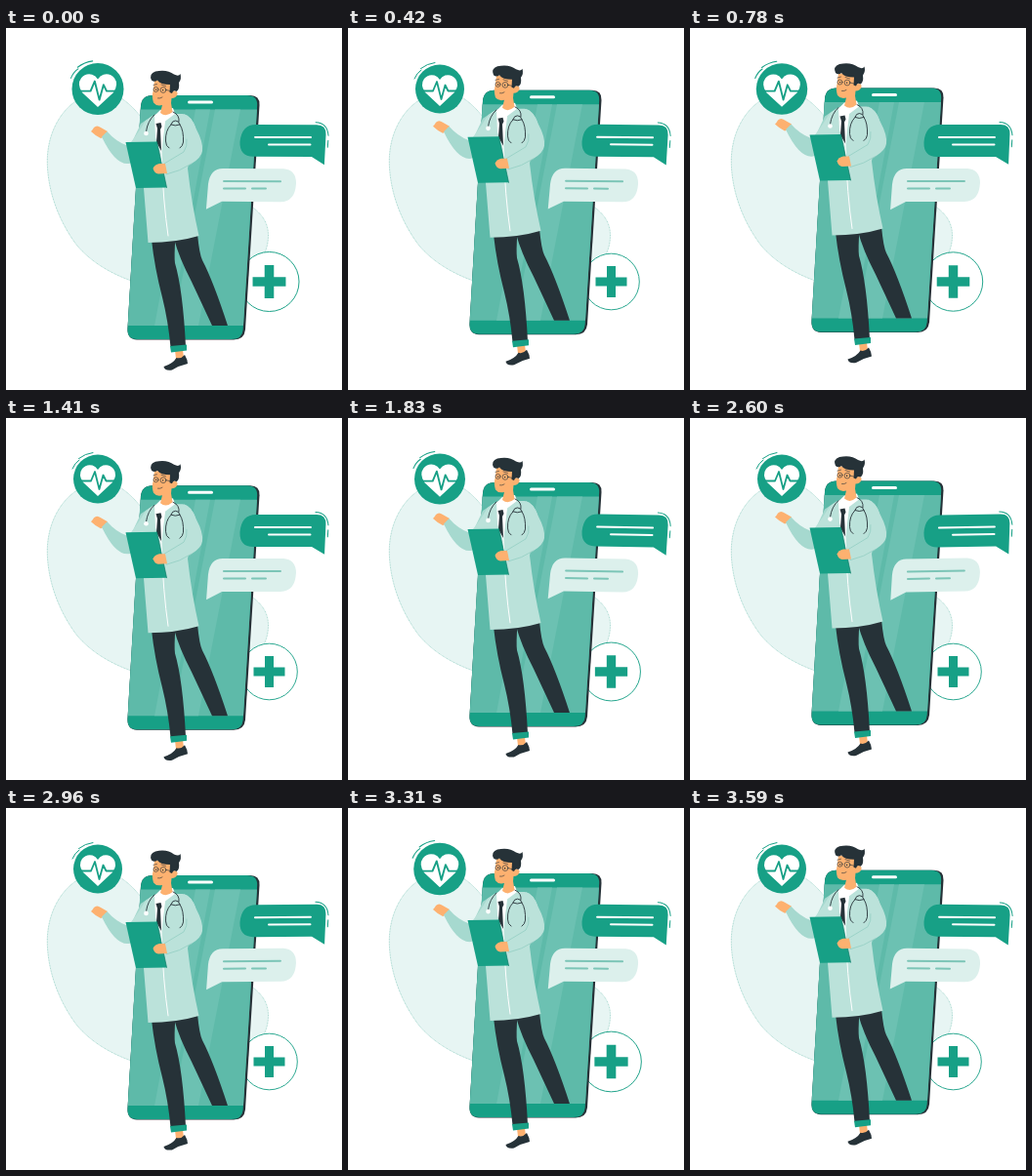
Animation, 344 px wide and 371 px high, one loop 3660 ms. Source, as an HTML page:

```html
<!DOCTYPE html>
<html lang="en">
<head>
<meta charset="utf-8">
<title>Online doctor</title>
<style>
  html, body { margin: 0; height: 100%; overflow: hidden; background: #fff; }
  svg { display: block; width: 344px; height: 371px; }
  .green { fill: #17a086; }
  .dark { fill: #263238; }
  .skin { fill: #fdb170; }
  .coat { fill: #bbe2da; }
  .sleeve { fill: #a6d9cf; }
  .white { fill: #fff; }
  .line { fill: none; stroke-linecap: round; stroke-linejoin: round; }
  .thin { stroke: #263238; stroke-width: .9; }
  .fold { stroke: #93cfc3; stroke-width: .8; }
  .mint { stroke: #17a086; }
  .pale { stroke: #fff; stroke-width: 2; }
</style>
</head>
<body>
<svg viewBox="0 0 344 371">
  <path fill="#e7f5f3" stroke="#7cc5b7" stroke-width=".6" stroke-dasharray="1 .6"
    d="M42.300 135C43 95 70 66 98 66C125 66 140 95 165 125C205 172 268 172 268.500 212C269 245 235 268 195 270C140 270 95 250 72 222C50 192 42 160 42.300 135Z"/>

  <g class="beat">
    <circle cx="269.5" cy="260" r="28.800" fill="#fff" stroke="#17a086" stroke-width=".9"/>
    <path class="green" d="M265 244h9v11.500h11.500v9H274V276h-9v-11.500h-11.500v-9H265Z"/>
  </g>

  <g id="float">
    <!-- phone -->
    <path class="dark" d="M150 69H250Q260 69 259.500 79L245 309Q244 319.500 233 319.500H134Q124 319 124.500 308L138 80Q139 69 150 69Z"/>
    <path class="green" d="M150 69H247Q257.500 69 257.200 79L242.700 309Q242 319 231 319H134Q124 319 124.500 308L138 80Q139 69 150 69Z"/>
    <path fill="#5ebaa9" d="M137.600 83.500H257L243 305H124.800Z"/>
    <path fill="#6cc1b2" d="M194 83.500H209L168 305H152ZM214 83.500H240L197 305H171Z"/>
    <path class="line" stroke="#fff" stroke-width="3" d="M187.500 76H210.500"/>

    <!-- legs -->
    <path class="dark" d="M172 216L196 211Q198 232 201 238Q212 259 227 305H211L190 260Q177 235 172 216Z"/>
    <path class="dark" d="M149 217L173.500 214Q172 234 173 241Q181 268 184 326L168.500 327Q166 300 160 276Q152 245 149 217Z"/>
    <path class="skin" d="M173 330H181L182 338L174 339Z"/>
    <path class="green" d="M168 326L185 324.500V330.500L169 332.500Z"/>
    <path class="dark" d="M161.500 347Q171 344 174.500 338Q179 339.500 183 335Q186 340 186 344Q177 346 170 350.500Q162 351.500 161.500 347Z"/>

    <!-- raised arm -->
    <path class="skin" d="M102 111L97 113Q91 110 87 106Q89 104 90 102Q93 99 97 102L104 106Z"/>
    <path class="sleeve" d="M98 111.500L103.500 106Q112 116 124 120.500L129 117L138 98L150 90L145 125Q135 137 126 139Q112 141 98 111.500Z"/>

    <!-- body -->
    <path class="coat" d="M147 92Q152 88 160 88L181 88Q190 90 194 102L186 144Q190 180 197.500 213Q174 220 145.500 220L141 164L128 117Q137 105 141 98Q143 94 147 92Z"/>
    <path class="white" d="M152 89L160 87L163 96L159 129L153 112Z"/>
    <path class="dark" d="M153.500 98L158.500 97L159.500 101L158 104L159 126L154 117L155 103Z"/>
    <path class="line" stroke="#fff" d="M159 127Q161 180 166 213"/>
    <path class="white" d="M152 90L158 84L171 82L173 88L161 97Z"/>

    <!-- stethoscope -->
    <path class="line thin" d="M152 89Q145 95 143.500 106M171 86Q178 89 177 96M167 123Q163.500 121 163.500 116Q163 105 169 99Q170 95 173.500 95Q177 95 178 99Q182 105 181.500 117Q181 121 178 123M169 99Q173 101 178 99"/>
    <circle cx="143.500" cy="108" r="2.300" class="white"/>

    <!-- clipboard and near arm -->
    <path class="green" d="M122.500 117L154.500 116.500L164.500 163.500L133 164Z"/>
    <path class="line" stroke="#0e7c68" stroke-width=".7" d="M154.500 116.500L164.500 163.500"/>
    <path class="coat" d="M182 88Q190 90 195 104Q202 117 201 126Q200 133 190 139Q178 147 164 150L162 139L182 127L185 116Z"/>
    <path class="line fold" d="M185 114Q186 121 182 127L162 139L164 150Q178 147 190 139"/>
    <path class="skin" d="M163 139L157 139Q152 140 150.500 144Q152 149 156 149.500L165 149Z"/>

    <!-- head -->
    <path class="skin" d="M152 54L169 54L170 65Q176 63 175.500 68Q174 72 169.500 72L169 77L170.500 86Q164 92 158 87L160 79Q154 80.500 151 76.500Q149 70 150.500 65Z"/>
    <path class="dark" d="M149 53.500Q146 47 153 44.500Q165 42 172 47.500Q177 50 178.500 47Q180 52 177 56Q178 63 174.500 65Q171 63 170 67L167.500 66L168 58Q158 58 155 53.500Q152 56 149 53.500Z"/>
    <g class="line" stroke="#263238" stroke-width=".6">
      <circle cx="153.500" cy="63" r="2.500"/>
      <circle cx="161" cy="63.500" r="2.900"/>
      <path d="M164 63.500L170 65M151 58.500L154.500 57.500M159 58L163.500 59.500M155.500 72Q158 72.500 160 71"/>
    </g>
    <path class="dark" d="M153 62.500h1.200v1.300h-1.200zM160 63h1.200v1.300h-1.200z"/>
  </g>

  <g class="beat">
    <circle class="green" cx="94" cy="62.500" r="25"/>
    <path class="white" d="M94 80L79 66Q73.500 58 78 52Q82 47 88.500 48.500Q92 49.500 94 53Q96 49.500 99.500 48.500Q106 47 110 52Q114.500 58 109 66Z"/>
    <path class="line mint" stroke-width="1.800" d="M75 64.500H87L91 55L95.500 73L99.500 58.500L102.500 64.500H113"/>
    <path class="line mint" d="M74.500 41.500Q81 36.500 89 35.500M68 52Q70.500 46 75 43"/>
  </g>

  <g class="sway">
    <path class="green" d="M256 99H318Q328 99 327.500 109L326 140L313 132H253Q239 131.500 239.500 117Q241 99 256 99Z"/>
    <path class="line pale" d="M255 112H312M269 119.500H311.500"/>
    <path class="line mint" d="M317 96.500Q329 97 330 110M329.800 115L329.300 122"/>
  </g>
  <g class="sway">
    <path fill="#dcf0ec" d="M222 144H284Q297 145 297 159Q296 178 281 178H221L205 186L207 160Q209 144 222 144Z"/>
    <path class="line" stroke="#7cc5b7" stroke-width="2" d="M223 157H281M223 164.500H245M252 164.500H266"/>
  </g>
</svg>
<script>
const LOOP = 3660, STEP = LOOP / 52, PERIOD = 1577, START = 0.06;
const floater = document.getElementById('float');
const beats = [...document.querySelectorAll('.beat')];
const sways = [...document.querySelectorAll('.sway')];
const beatCenters = [[269.5, 260], [94, 62.5]];
const swayCenters = [[284, 119], [251, 165]];

// Linear interpolation through [phase, value] stops
function track(stops, p) {
  const i = stops.findIndex(([at]) => at >= p) || 1;
  const [a, from] = stops[i - 1], [b, to] = stops[i];
  return from + (to - from) * (p - a) / (b - a);
}

const lift = [[0, 1.15], [.5, -8.45], [1, 1.15]];
const pulse = [[0, 1], [.1, 1.1], [.3, 1], [.4, 1], [.5, 1.1], [.6, 1], [1, 1]];
const wind = [[0, 0], [.25, 1], [.75, -1], [1, 0]];

function draw(now) {
  const t = Math.floor((now % LOOP + 10) / STEP) * STEP % LOOP;
  const p = (START + t / PERIOD) % 1;
  const scale = track(pulse, p), angle = track(wind, p);
  floater.setAttribute('transform', `translate(0 ${track(lift, p)})`);
  beats.forEach((el, i) => {
    const [x, y] = beatCenters[i];
    el.setAttribute('transform', `translate(${x} ${y}) scale(${scale}) translate(${-x} ${-y})`);
  });
  sways.forEach((el, i) => el.setAttribute('transform', `rotate(${angle} ${swayCenters[i]})`));
}

const begin = performance.now();
function tick() {
  draw(performance.now() - begin);
  requestAnimationFrame(tick);
}
tick();
</script>
</body>
</html>
```
